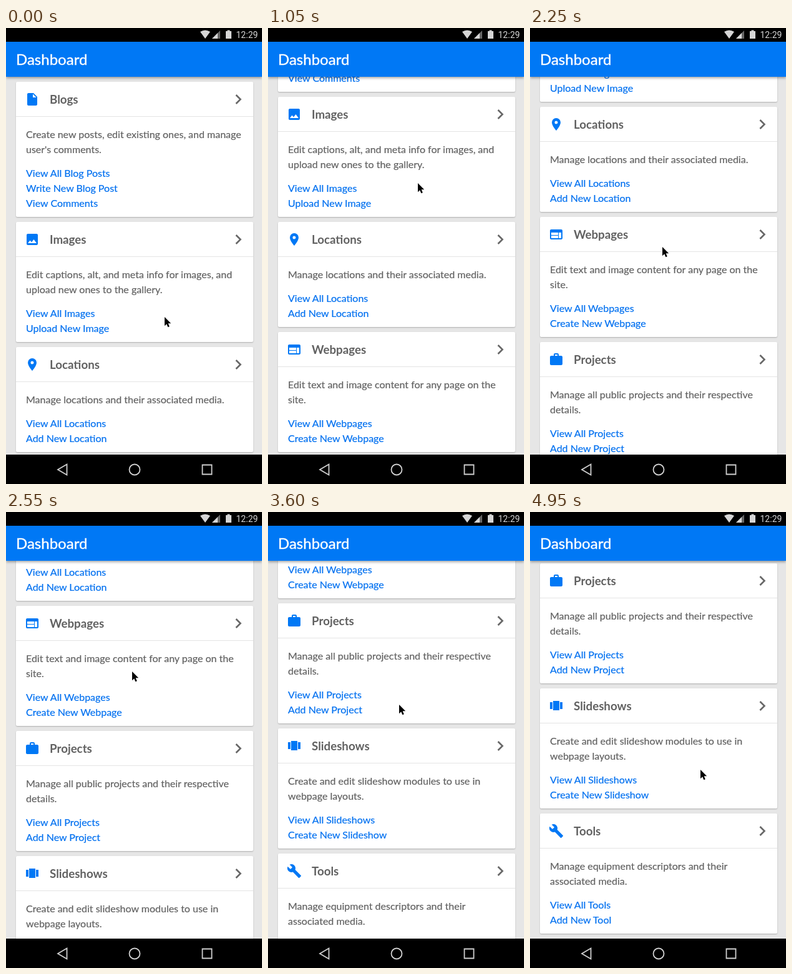
Recreate the animation shown at these times as an HTML page. Size 410 px wide and 729 px high, loop 6 s.

```html
<!DOCTYPE html>
<html lang="en">
<head>
<meta charset="utf-8">
<title>Dashboard</title>
<style>
  html, body { margin: 0; width: 100%; height: 100%; overflow: hidden; }
  body { position: relative; background: #e6e6e6; color: #616161; font: 16px/24px Lato, sans-serif; -webkit-text-stroke: .2px; }
  #list { position: absolute; top: 86px; left: 16px; width: 380px; }
  .card { position: relative; margin-bottom: 8px; padding-bottom: 10px; background: #fff; border-radius: 2px; box-shadow: 0 1px 2px rgba(0, 0, 0, .24); }
  .card h2 { margin: 0; height: 55px; padding-left: 54px; border-bottom: 1px solid #e4e4e4; font-size: 18.72px; line-height: 56px; -webkit-text-stroke: 0; }
  .card svg { position: absolute; top: 16px; left: 14px; width: 24px; fill: #0078f5; }
  .card .chevron { top: 12px; left: 340px; width: 32px; fill: #686868; }
  .card p { margin: 16px 16px 14px; white-space: pre; }
  .card a { display: block; margin-left: 16px; color: #0070f0; }
  #bar { position: absolute; top: 22px; left: 0; width: 100%; height: 56px; padding-left: 16px; box-sizing: border-box; background: #0078f5; color: #fff; font-size: 24px; line-height: 56px; box-shadow: 0 2px 4px rgba(0, 0, 0, .35); -webkit-text-stroke: .4px; }
  #system { position: absolute; top: 0; left: 0; -webkit-text-stroke: 0; }
</style>
</head>
<body>
<div id="list"></div>
<div id="bar">Dashboard</div>
<svg id="system" width="410" height="729">
  <path d="M0 0H410V22H0zM0 682H410V729H0z"/>
  <g fill="#d6d6d6">
    <path d="M311 6Q319 1 327 6L319 17z"/>
    <path d="M343 4V17H330z" fill="#666"/>
    <path d="M339 8V17H330z"/>
    <path d="M354.5 3.5h4V5H361V17H352V5h2.5z"/>
    <text x="368.5" y="16" font-family="Roboto, sans-serif" font-size="14">12:29</text>
  </g>
  <g fill="none" stroke="#d0d0d0" stroke-width="1.8">
    <path d="M97.5 697.5V714.5L83 706z"/>
    <circle cx="206" cy="706" r="8.5"/>
    <path d="M314.5 698.5h15v15h-15z"/>
  </g>
  <path id="cursor" d="M0 0V14.2l3.2-3 2.2 5 2.4-1-2.1-4.9H10.2z" stroke="#fff" stroke-width="1.2" paint-order="stroke"/>
</svg>
<script>
const LOOP = 6000, STEP = 150;

// title, icon path, description, links
const cards = [
  ["Blogs", "M6 2c-1.1 0-2 .9-2 2v16c0 1.1.9 2 2 2h12c1.1 0 2-.9 2-2V8l-6-6H6zm7 7V3.5L18.500 9H13z",
    "Create new posts, edit existing ones, and manage\nuser's comments.",
    ["View All Blog Posts", "Write New Blog Post", "View Comments"]],
  ["Images", "M21 19V5c0-1.1-.9-2-2-2H5c-1.1 0-2 .9-2 2v14c0 1.1.9 2 2 2h14c1.1 0 2-.9 2-2zM8.500 13.500l2.500 3 3.500-4.500 4.500 6H5l3.500-4.500z",
    "Edit captions, alt, and meta info for images, and\nupload new ones to the gallery.",
    ["View All Images", "Upload New Image"]],
  ["Locations", "M12 2a7 7 0 0 0-7 7c0 5.250 7 13 7 13s7-7.750 7-13a7 7 0 0 0-7-7zm0 9.500a2.500 2.500 0 1 1 0-5 2.500 2.500 0 0 1 0 5z",
    "Manage locations and their associated media.",
    ["View All Locations", "Add New Location"]],
  ["Webpages", "M20 4H4c-1.1 0-2 .9-2 2v12c0 1.1.9 2 2 2h16c1.1 0 2-.9 2-2V6c0-1.1-.9-2-2-2zm-5 14H4v-4h11v4zm0-5H4V9h11v4zm5 5h-4V9h4v9z",
    "Edit text and image content for any page on the\nsite.",
    ["View All Webpages", "Create New Webpage"]],
  ["Projects", "M20 6h-4V4c0-1.1-.9-2-2-2h-4c-1.1 0-2 .9-2 2v2H4c-1.1 0-2 .9-2 2v11c0 1.1.9 2 2 2h16c1.1 0 2-.9 2-2V8c0-1.1-.9-2-2-2zm-6 0h-4V4h4v2z",
    "Manage all public projects and their respective\ndetails.",
    ["View All Projects", "Add New Project"]],
  ["Slideshows", "M7 19h10V4H7v15zm-5-2h4V6H2v11zM18 6v11h4V6h-4z",
    "Create and edit slideshow modules to use in\nwebpage layouts.",
    ["View All Slideshows", "Create New Slideshow"]],
  ["Tools", "M22.7 19l-9.1-9.1c.9-2.3.4-5-1.5-6.9-2-2-5-2.4-7.4-1.3L9 6 6 9 1.6 4.7C.4 7.1.9 10.1 2.9 12.1c1.9 1.9 4.6 2.4 6.9 1.5l9.1 9.1c.4.4 1 .4 1.4 0l2.3-2.3c.5-.4.5-1.1.1-1.4z",
    "Manage equipment descriptors and their\nassociated media.",
    ["View All Tools", "Add New Tool"]]
];

const icon = (path, name = "") => `<svg class="${name}" viewBox="0 0 24 24"><path d="${path}"/></svg>`;
const chevron = icon("M10 6 8.590 7.410 13.170 12l-4.580 4.590L10 18l6-6z", "chevron");

const list = document.getElementById("list");
const cursor = document.getElementById("cursor");
list.innerHTML = cards.map(([title, path, text, links]) => `<div class="card">
  <h2>${title}</h2>${icon(path)}${chevron}<p>${text}</p>${links.map(link => `<a>${link}</a>`).join("")}
</div>`).join("");

// time, x, y: upward drags alternate with returns
const cursorKeys = [
  [300, 253, 461], [1200, 238, 230], [1800, 223, 461], [2700, 199, 237], [2850, 199, 237],
  [3270, 219, 464], [3900, 200, 170], [4350, 200, 170], [4950, 272, 411]
];
// time, offset
const scrollKeys = [
  [300, 0], [600, 30], [1050, 200], [1350, 274], [1650, 290], [1800, 290], [1950, 304], [2250, 384],
  [2550, 536], [2700, 598], [3300, 598], [3450, 642], [3600, 740], [3750, 804]
];

const linear = p => p;
const smooth = p => p * p * (3 - 2 * p);

function sample(keys, time, ease) {
  const next = keys.findIndex(key => key[0] > time);
  if (next === 0) return keys[0].slice(1);
  if (next < 0) return keys[keys.length - 1].slice(1);
  const [start, ...from] = keys[next - 1], [end, ...to] = keys[next];
  const p = ease((time - start) / (end - start));
  return from.map((value, i) => Math.round(value + (to[i] - value) * p));
}

function draw() {
  const time = Math.floor(performance.now() % LOOP / STEP) * STEP;
  const [x, y] = sample(cursorKeys, time, smooth);
  const [scroll] = sample(scrollKeys, time, linear);
  list.style.transform = `translateY(${-scroll}px)`;
  cursor.setAttribute("transform", `translate(${x + 1} ${y + 1})`);
  requestAnimationFrame(draw);
}
draw();
</script>
</body>
</html>
```
